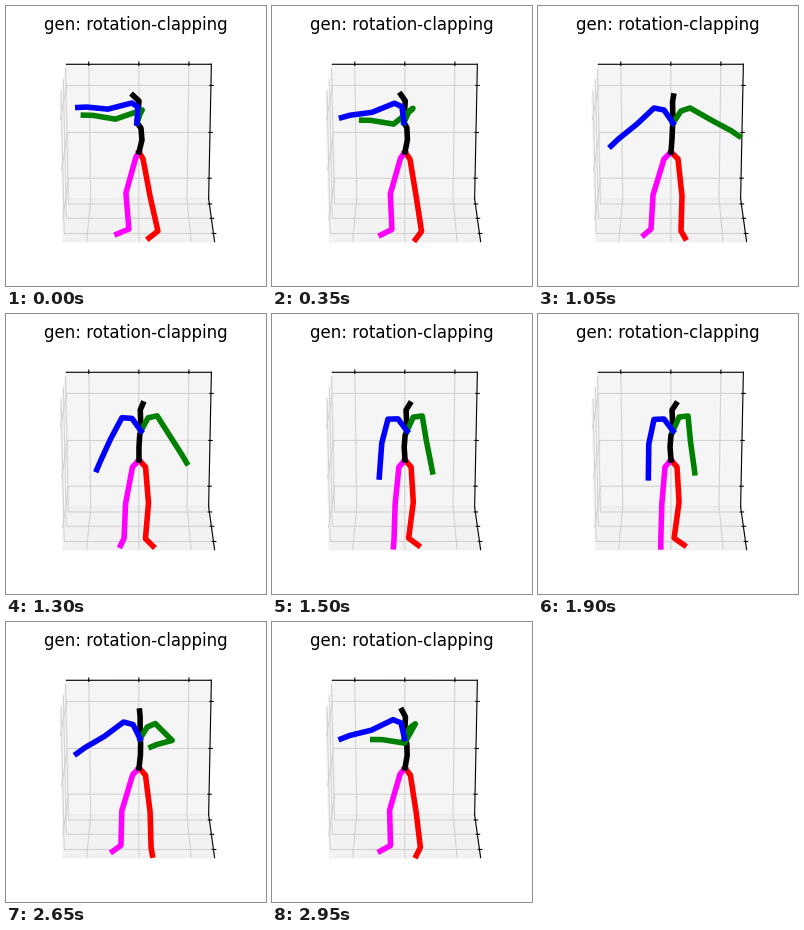
Recreate the animation shown at these times as a matplotlib script. Size 260 px wide and 280 px high, loop 3000 ms.

```python
import numpy as np
import matplotlib.pyplot as plt
from matplotlib.animation import FuncAnimation

W, H, DPI = 260, 280, 100
FRAMES, STEP = 60, 50

# Phase of the movement over time: 0 clapping, 1 arms spread, 2 arms down
TIMES = [0, 650, 1060, 1500, 1900, 2200, 2480, 2950]
PHASE = [0, 0.54, 1, 1.94, 2, 1.75, 1, 0.4]

# Joints in pixels, one row per phase
HIP = np.full((3, 2), (133, 146))
SPINE = [
    [(136, 134), (135, 122), (131, 117), (133, 95), (127, 89.5)],
    [(134, 133), (134.5, 121), (135, 117), (134.5, 96), (135.5, 90)],
    [(132, 133), (133, 121), (135, 117), (134, 96), (138, 90)],
]
LEFT_LEG = [
    [(137, 153), (144, 190), (152, 225), (143, 232)],
    [(140, 153), (144, 190), (143, 225), (147, 232)],
    [(139, 153), (141, 188), (136, 224), (146, 231)],
]
RIGHT_LEG = [
    [(130, 151), (120, 187), (123, 223), (111, 228)],
    [(126, 153), (115, 189), (113, 223), (106, 229)],
    [(127, 153), (124, 190), (123, 225), (123, 233)],
]
LEFT_ARM = [
    [(134, 108), (136, 104), (109, 113), (77, 109)],
    [(143, 105), (152, 102), (175, 115), (201, 130)],
    [(141, 103), (150, 102), (152, 127), (156, 159)],
]
RIGHT_ARM = [
    [(132, 101), (126, 97), (102, 103), (72, 101)],
    [(126, 104), (116, 102), (99, 118), (73, 140)],
    [(126, 105), (116, 105.5), (111, 130), (111, 164)],
]
LATE = np.array([1, 1, 1, 4])  # the left forearm opens after the upper arm


def bones(root, joints):
    """Bone vectors per phase, with depth inferred from a fixed bone length."""
    joints = np.array(joints, float)
    flat = np.diff(np.concatenate([root[:, None], joints], axis=1), axis=1)
    seen = np.hypot(flat[..., 0], flat[..., 1])
    depth = np.sqrt((1.05 * seen.max(axis=0)) ** 2 - seen ** 2)
    return np.dstack([flat, depth])


def chain(start, limb, p, late=1):
    """Turn every bone between two phases and string them together."""
    i = min(int(p), 1)
    u = np.full((limb.shape[1], 1), p - i)
    if i == 0:
        u[:, 0] **= late
    v = (1 - u) * limb[i] + u * limb[i + 1]
    length = np.linalg.norm(limb[i], axis=1) / np.linalg.norm(v, axis=1)
    steps = v[:, :2] * length[:, None]
    return np.vstack([start, start + np.cumsum(steps, axis=0)])


def with_wrist(arm):
    elbow, hand = arm[-2:]
    wrist = elbow + 0.71 * (hand - elbow)
    wrist[1] -= 0.03 * abs(hand[0] - elbow[0])
    return np.insert(arm, -1, wrist, axis=0)


def phase(t):
    """Key points rounded off by a short moving average."""
    return np.interp(t + np.linspace(-60, 60, 9), TIMES, PHASE).mean()


chest = np.array(SPINE)[:, 2]
spine = bones(HIP, SPINE)
left_leg, right_leg = bones(HIP, LEFT_LEG), bones(HIP, RIGHT_LEG)
left_arm, right_arm = bones(chest, LEFT_ARM), bones(chest, RIGHT_ARM)

plt.rc("grid", color="#d2d2d2")
fig = plt.figure(figsize=(W / DPI, H / DPI), dpi=DPI, facecolor="white")

# Empty 3D room
room = fig.add_axes([14.6 / W, 16.7 / H, 230.3 / W, 230.3 / H], projection="3d")
room.patch.set_alpha(0)
room.set(xlim=(-1, 1), ylim=(-1, 1), zlim=(-1, 1))
for axis, shift in zip((room.xaxis, room.yaxis, room.zaxis), (0, 0.005, -0.045)):
    axis.set_ticks(0.69 * np.arange(-1, 2) + shift)
    axis.set_ticklabels([])
room.view_init(elev=110, azim=-90.01)  # slight turn keeps the left wall visible

# Pixel-space layer for title and figure
stage = fig.add_axes([0, 0, 1, 1], zorder=5)
stage.set(xlim=(0, W), ylim=(H, 0))
stage.axis("off")
stage.text(130.3, 24.5, "gen: rotation-clapping", fontsize=12,
           family="DejaVu Sans", ha="center", va="baseline")

COLORS = ["red", "magenta", "black", "green", "blue"]
lines = [stage.plot([], [], color=c, lw=4)[0] for c in COLORS]


def draw(n):
    p = phase(n * STEP)
    back = chain(HIP[0], spine, p)
    chains = [
        chain(HIP[0], left_leg, p),
        chain(HIP[0], right_leg, p),
        back,
        with_wrist(chain(back[3], left_arm, p, LATE)),
        with_wrist(chain(back[3], right_arm, p)),
    ]
    for line, pts in zip(lines, chains):
        line.set_data(pts[:, 0], pts[:, 1])
    return lines


anim = FuncAnimation(fig, draw, frames=FRAMES, interval=STEP,
                     repeat=True, repeat_delay=0, blit=False)
plt.show()
```
